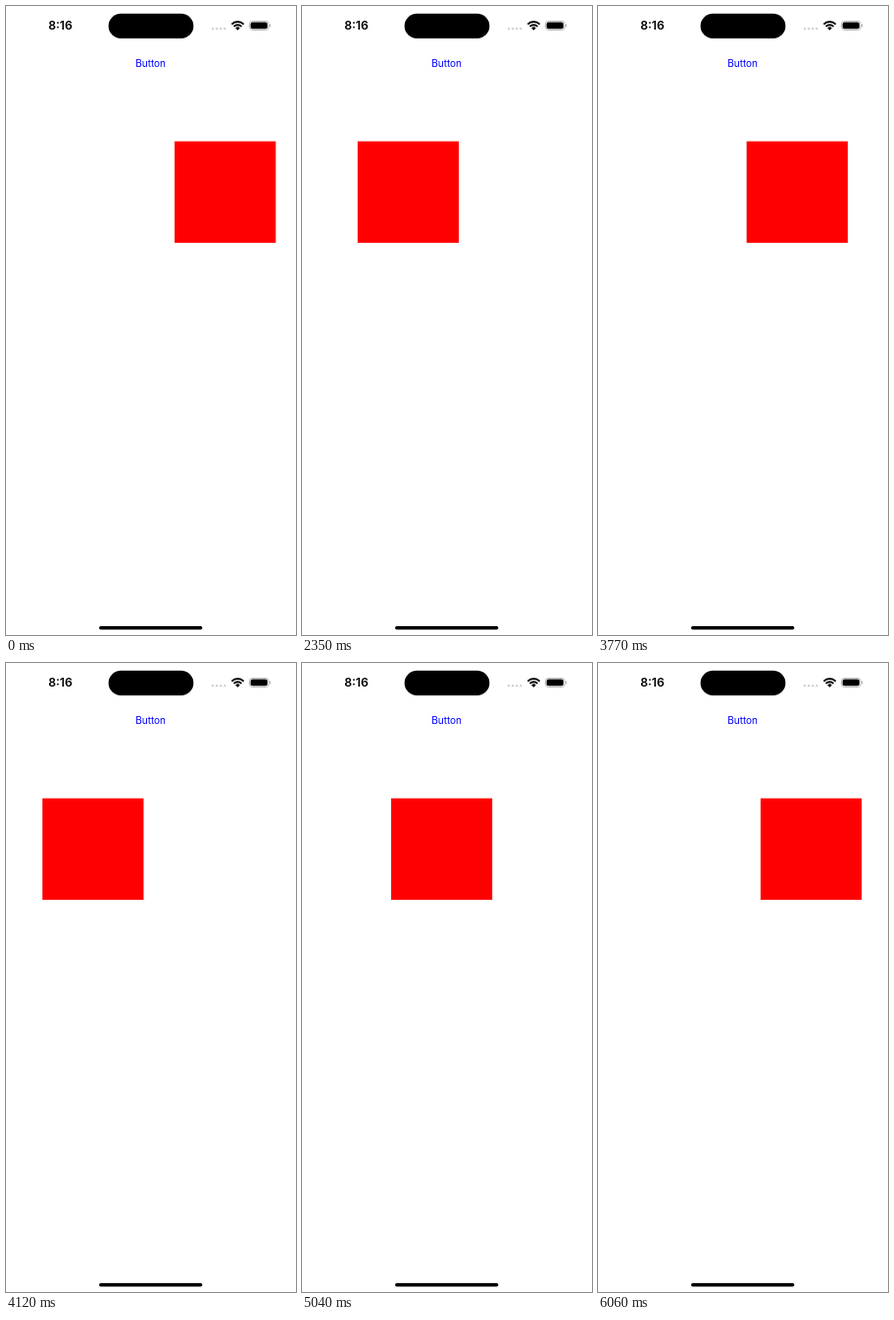
Recreate the animation shown at these times as an HTML page with a canvas. Size 296 px wide and 640 px high, loop 6.17 s.

```html
<!DOCTYPE html>
<html lang="en">
<head>
<meta charset="utf-8">
<title>Sliding square</title>
<style>
  html, body { margin: 0; width: 100%; height: 100%; overflow: hidden; background: #fff; }
  canvas { display: block; width: 296px; height: 640px; }
</style>
</head>
<body>
<canvas id="stage"></canvas>
<script>
const W = 296, H = 640, LOOP = 6170;
const PT = W / 430; // one device point in stage pixels
const TAP = 1900, RELEASE = 2003, SLIDE = 2075, FADE = 250;

// Screen refreshes come in bursts of six: [first, last] in ms.
const BURSTS = [
  [1900, 2450], [2560, 3100], [3220, 3770], [3890, 4470],
  [4590, 5160], [5260, 5830], [5950, 6500]
];
const TICKS = BURSTS.flatMap(([a, b]) =>
  Array.from({ length: 6 }, (_, i) => Math.round((a + (b - a) * i / 5) / 10) * 10));

const canvas = document.getElementById('stage');
const ctx = canvas.getContext('2d');
const dpr = window.devicePixelRatio || 1;
canvas.width = W * dpr;
canvas.height = H * dpr;
ctx.scale(dpr, dpr);

function pill(x, y, w, h, r, color) {
  ctx.fillStyle = color;
  ctx.beginPath();
  ctx.roundRect(x, y, w, h, r);
  ctx.fill();
}

function label(text, x, baseline, font, color) {
  ctx.font = font + ' Inter, sans-serif';
  ctx.fillStyle = color;
  ctx.textAlign = 'center';
  ctx.fillText(text, x, baseline);
}

function wifi(x, y) {
  ctx.fillStyle = '#000';
  for (const [inner, outer] of [[0, 3.2], [4.5, 6.4], [7.7, 9.6]]) {
    ctx.beginPath();
    ctx.arc(x, y, outer, -Math.PI * 0.75, -Math.PI * 0.25);
    ctx.arc(x, y, inner, -Math.PI * 0.25, -Math.PI * 0.75, true);
    ctx.fill();
  }
}

function battery(x, y) {
  ctx.strokeStyle = '#a6a6a6';
  ctx.lineWidth = 0.8;
  ctx.beginPath();
  ctx.roundRect(x + 0.4, y + 0.4, 19.6, 9, 3);
  ctx.stroke();
  pill(x + 1.6, y + 1.6, 17.2, 6.6, 1.9, '#000');
  pill(x + 20.9, y + 3.3, 1, 3.2, 0.5, '#a6a6a6');
}

function statusBar() {
  label('8:16', 55.5, 24.4, '600 12.2px', '#000');
  pill(152 * PT, 7.8, 126 * PT, 25.2, 12.6, '#000');
  for (let i = 0; i < 4; i++) pill(209.9 + i * 4.1, 22, 2.3, 2.3, 1.15, '#cbcbcb');
  wifi(236.5, 24.7);
  battery(248, 15);
}

function squareX(t) {
  const progress = t < RELEASE ? 1 : (t - RELEASE) % SLIDE / SLIDE;
  return (50 + 200 * progress) * PT;
}

function buttonOpacity(t) {
  if (t < TAP) return 1;
  const p = Math.min(1, Math.max(0, (t - RELEASE) / FADE));
  const eased = p < 0.5 ? 2 * p * p : 1 - 2 * (1 - p) ** 2;
  return 0.2 + 0.8 * eased;
}

function draw(t) {
  ctx.fillStyle = '#fff';
  ctx.fillRect(0, 0, W, H);
  statusBar();

  ctx.globalAlpha = buttonOpacity(t);
  label('Button', 147.6, 62, '400 10px', '#00f');
  ctx.globalAlpha = 1;

  ctx.fillStyle = '#f00';
  ctx.fillRect(squareX(t), 200 * PT, 150 * PT, 150 * PT);
  pill(95, 631, 105.4, 3.5, 1.75, '#000');
}

const start = performance.now();
function frame() {
  const t = (performance.now() - start) % LOOP;
  draw(TICKS.findLast(tick => tick <= t) ?? 0);
  requestAnimationFrame(frame);
}
frame();
</script>
</body>
</html>
```
